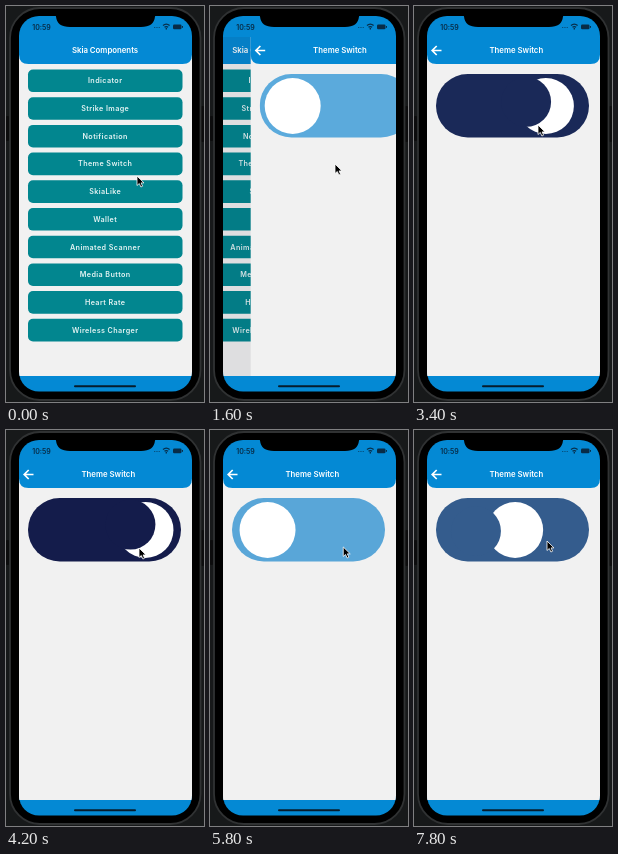
These frames come from a looping animation (198 px wide and 396 px high, 8 s). An HTML page:

```html
<!DOCTYPE html>
<html lang="en">
<head>
<meta charset="utf-8">
<title>Theme switch demo</title>
<style>
  html, body { margin: 0; width: 100%; height: 100%; overflow: hidden; background: #17191a; }
  svg { display: block; width: 198px; height: 396px; }
  text { font-family: Inter, "Liberation Sans", sans-serif; font-weight: 600; text-anchor: middle; fill: #fff; }
  .title { font-size: 7.8px; }
  .label { font-size: 7.2px; letter-spacing: .4px; fill: #e6f4f4; }
  .time { font-size: 7px; fill: #082c47; }
  .blue { fill: #0489d4; }
  .paper { fill: #f1f1f1; }
</style>
</head>
<body>
<svg viewBox="0 0 198 396">
  <defs>
    <clipPath id="screen"><rect x="13" y="10" width="173" height="375.500" rx="20"/></clipPath>
    <clipPath id="safe"><rect x="13" y="31" width="173" height="339"/></clipPath>
    <clipPath id="pill"><rect x="22" y="68" width="153" height="63.500" rx="31.750"/></clipPath>
    <g id="page">
      <rect class="paper" x="13" y="31" width="173" height="339"/>
      <path class="blue" d="M13 31H186V48.500q0 9.500-9.500 9.500H22.500q-9.500 0-9.500-9.500z"/>
    </g>
  </defs>

  <!-- phone body -->
  <rect x="0" y="110" width="3" height="25" rx="1" fill="#0c0c0d"/>
  <rect x="195" y="100" width="3" height="36" rx="1" fill="#0c0c0d"/>
  <rect x="4" y="2" width="190.500" height="392" rx="30" fill="#000" stroke="#303233" stroke-width="1.800"/>

  <g clip-path="url(#screen)">
    <rect class="blue" x="13" y="10" width="173" height="376"/>
    <g clip-path="url(#safe)">
      <g id="list">
        <use href="#page"/>
        <text class="title" x="99" y="47.300">Skia Components</text>
      </g>
      <rect id="dim" x="13" y="31" width="173" height="339" fill="#101028"/>
      <g id="detail">
        <use href="#page"/>
        <path d="M27.500 44.500H18.500M22.700 40L18.200 44.500L22.700 49" fill="none" stroke="#fff" stroke-width="1.700"/>
        <text class="title" x="102.300" y="47.300">Theme Switch</text>
        <g clip-path="url(#pill)">
          <rect id="track" x="22" y="68" width="153" height="64"/>
          <circle id="knob" cy="100" r="28" fill="#fff"/>
          <circle id="bite" r="25"/>
        </g>
      </g>
    </g>
  </g>

  <!-- status bar, notch and home indicator -->
  <path d="M46 9.500q4 0 4 3q0 8.500 9 8.500H140q9 0 9-8.500q0-3 4-3z" id="notch"/>
  <text class="time" x="35.500" y="23.500">10:59</text>
  <g fill="none" stroke="#082c47">
    <path d="M148 21.500h6" stroke-dasharray="1 .7" opacity=".6"/>
    <path d="M157 19.500q3.300-2.800 6.600 0M158.500 21.300q1.800-1.500 3.600 0" stroke-width="1.300"/>
    <path d="M160.300 22v1.500" stroke-width="1.300"/>
  </g>
  <rect x="167" y="18.500" width="8.500" height="4.800" rx="1.300" fill="#082c47"/>
  <rect x="176" y="20" width="1" height="1.800" fill="#082c47"/>
  <rect x="68" y="379.300" width="62" height="2" rx="1" fill="#061c2c"/>

  <path id="cursor" d="M0 0V9.500L2.300 7.500L3.900 11L5.600 10.200L4.100 6.900H7z" stroke="#fff" stroke-width=".8"/>
</svg>
<script>
const LOOP = 8000, STEP = 200, SCREEN = 173;
const $ = id => document.getElementById(id);
const labels = ['Indicator', 'Strike Image', 'Notification', 'Theme Switch', 'SkiaLike',
  'Wallet', 'Animated Scanner', 'Media Button', 'Heart Rate', 'Wireless Charger'];

// a notch with flared top corners
$('notch').setAttribute('d', 'M46 9.5q4 0 4 1q1 10.5 14 10.500H135q13 0 14-10.500q0-1 4-1z');

$('list').insertAdjacentHTML('beforeend', labels.map((label, i) => {
  const y = 63.5 + i * 27.7;
  return `<rect x="22" y="${y}" width="154.500" height="22.600" rx="5" fill="#02868f"/>
    <text class="label" x="99.200" y="${y + 13.8}">${label}</text>`;
}).join(''));

// time, x, y of the pointer tip
const pointer = [[0, 131, 170], [400, 131, 170], [1200, 125, 158], [1600, 125, 158],
  [2400, 60, 113], [2600, 60, 113], [3400, 124, 119], [4000, 133, 118], [5600, 133, 118],
  [6600, 136, 105], [6800, 133, 111], [LOOP, 133, 111]];

// start time, direction of each toggle
const toggles = [[2420, 1], [4029, -1], [5643, 1], [7168, -1]];
const TOGGLE_MS = 1300;

const clamp = v => Math.min(1, Math.max(0, v));
const mix = (a, b, k) => a + (b - a) * k;
const easeInOut = u => u < .5 ? 2 * u * u : 1 - 2 * (1 - u) ** 2;

function pointerAt(t) {
  const i = pointer.findIndex(p => p[0] > t);
  const [t0, x0, y0] = pointer[i - 1], [t1, x1, y1] = pointer[i];
  const k = easeInOut((t - t0) / (t1 - t0));
  return [mix(x0, x1, k), mix(y0, y1, k)];
}

// critically damped push of the second page
function pushAt(t) {
  const w = Math.max(0, t - 1360) * .0137;
  return t > 2200 ? 1 : 1 - (1 + w) * Math.exp(-w);
}

function draw(t) {
  const push = pushAt(t);
  $('list').setAttribute('transform', `translate(${-.3 * SCREEN * push})`);
  $('dim').setAttribute('opacity', .1 * push);
  $('detail').setAttribute('transform', `translate(${SCREEN * (1 - push)})`);

  const night = toggles.reduce((sum, [start, dir]) =>
    sum + dir * easeInOut(clamp((t - start) / TOGGLE_MS)), 0);
  const x = mix(55, 142.5, night);
  const sky = `rgb(${mix(91, 17, night)},${mix(170, 23, night)},${mix(220, 70, night)})`;
  $('track').setAttribute('fill', sky);
  $('bite').setAttribute('fill', sky);
  $('knob').setAttribute('cx', x);
  $('bite').setAttribute('cx', 34 + 1.63 * (x - 84));
  $('bite').setAttribute('cy', 104 - .17 * (x - 84));

  $('cursor').setAttribute('transform', `translate(${pointerAt(t)})`);
}

const begin = performance.now();
function tick() {
  const t = (performance.now() - begin) % LOOP;
  draw(Math.floor(t / STEP) * STEP);
  requestAnimationFrame(tick);
}
tick();
</script>
</body>
</html>
```
